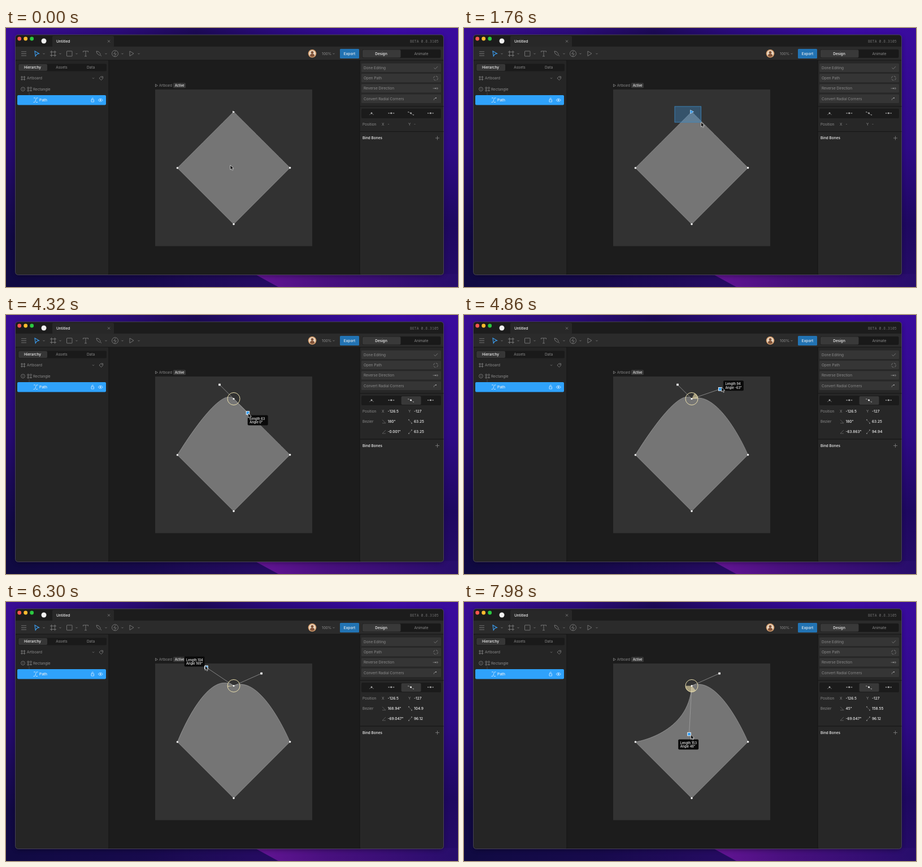
Write an HTML page that moves like this. It is 800 by 459 pixels and loops after 8 s.

```html
<!DOCTYPE html>
<html lang="en">
<head>
<meta charset="utf-8">
<title>Path editing</title>
<style>
html, body { margin: 0; width: 100%; height: 100%; overflow: hidden; background: #1d0a58; }
svg { display: block; width: 100vw; height: 100vh; }
text { font: 6.5px Inter, sans-serif; fill: #8c8c8c; white-space: pre; }
.on { fill: #f2f2f2; font-weight: 500; }
.mid { text-anchor: middle; }
.beta { font: 6.5px "Noto Sans Mono", monospace; fill: #707070; }
.small { font-size: 5.5px; }
.tip { font-size: 5.6px; font-weight: 500; fill: #eee; }
.icon { fill: none; stroke: #858585; stroke-width: .8; }
</style>
</head>
<body>
<svg viewBox="0 0 800 459" preserveAspectRatio="none">
  <defs>
    <linearGradient id="top">
      <stop offset="0" stop-color="#390d94"/><stop offset=".25" stop-color="#2b0b78"/>
      <stop offset=".42" stop-color="#1c0a55"/><stop offset=".6" stop-color="#2a0a7c"/>
      <stop offset=".85" stop-color="#3b0aa2"/><stop offset="1" stop-color="#390b9c"/>
    </linearGradient>
    <linearGradient id="bottom">
      <stop offset="0" stop-color="#100a42"/><stop offset=".3" stop-color="#170a4c"/>
      <stop offset=".55" stop-color="#240b60"/><stop offset="1" stop-color="#260c68"/>
    </linearGradient>
    <linearGradient id="glow">
      <stop offset="0" stop-color="#641595"/><stop offset=".35" stop-color="#49107f"/>
      <stop offset="1" stop-color="#270d6b"/>
    </linearGradient>
    <linearGradient id="left" x2="0" y2="1">
      <stop offset="0" stop-color="#390d94"/><stop offset=".45" stop-color="#260a72"/>
      <stop offset=".63" stop-color="#1b0a57"/><stop offset=".8" stop-color="#110943"/>
      <stop offset="1" stop-color="#100a42"/>
    </linearGradient>
    <linearGradient id="right" x2="0" y2="1">
      <stop offset="0" stop-color="#390b9c"/><stop offset=".45" stop-color="#2e0a86"/>
      <stop offset=".75" stop-color="#1e0860"/><stop offset="1" stop-color="#260c68"/>
    </linearGradient>
    <filter id="blur"><feGaussianBlur stdDeviation="4"/></filter>
  </defs>
  <rect width="800" height="230" fill="url(#top)"/>
  <rect y="230" width="800" height="229" fill="url(#bottom)"/>
  <rect y="12" width="24" height="447" fill="url(#left)"/>
  <rect x="768" y="12" width="32" height="447" fill="url(#right)"/>
  <path d="M440 436L482 459H800V436Z" fill="url(#glow)"/>
  <rect x="17" y="15" width="757" height="424" rx="6" opacity=".4" filter="url(#blur)"/>
  <g id="shell"></g>
  <g id="live"></g>
</svg>
<script>
const LOOP = 8000, UNIT = 0.559, TOP = [403, 148.5];

const rect = (x, y, w, h, fill, rx = 0, more = '') =>
  `<rect x="${x}" y="${y}" width="${w}" height="${h}" fill="${fill}" rx="${rx}" ${more}/>`;
const text = (x, y, s, cls = '') => `<text x="${x}" y="${y + 2.3}" class="${cls}">${s}</text>`;
const dot = (x, y, r, fill, more = '') => `<circle cx="${x}" cy="${y}" r="${r}" fill="${fill}" ${more}/>`;
const icon = (d, more = '') => `<path class="icon" d="${d}" ${more}/>`;
const ring = (x, y, r, more = '') => `<circle class="icon" cx="${x}" cy="${y}" r="${r}" ${more}/>`;
const chevron = (x, y) => icon(`M${x - 1.5} ${y - .7}l1.5 1.5l1.5 -1.5`);

function frame() {
  return rect(16.5, 12, 758, 425.5, '#1c1c1c', 5) +
    rect(82, 14, 109, 20, '#282828', 2) +
    rect(17, 33, 757.5, 24, '#2b2b2b') +
    rect(17, 57, 165, 380, '#252525', 3) +
    rect(626, 57, 148.5, 380, '#272727', 3) +
    rect(182, 57, 444, 380, '#1c1c1c') +
    rect(17, 56.5, 757, 1, '#161616') +
    rect(181.5, 57, 1, 380, '#141414') + rect(625.5, 57, 1, 380, '#141414') +
    rect(16.5, 12, 758, 425.5, 'none', 5, 'stroke="#5b5369" stroke-width=".7"');
}

function header() {
  const lights = ['#fb5650', '#fdbb2e', '#2bc840'].map((c, i) => dot(23.7 + 11 * i, 19, 3.4, c));
  return lights.join('') + dot(67, 23, 4.5, '#f0f0f0') +
    text(89, 23.5, 'Untitled', 'on') + icon('M180 21.5l4 4m0 -4l-4 4') +
    text(715, 23.5, 'BETA 0.8.3105', 'beta') +
    icon('M27 42h9M27 45.5h9M27 49h9') +
    icon('M51 41l7.5 4.3l-4 1.2l-2.3 3.4Z', 'style="stroke:#3ba0f5;stroke-width:1.1"') +
    icon('M80.5 40v11M86.5 40v11M78 42.5h11M78 48.5h11') +
    rect(107.5, 41, 9.5, 9, 'none', .5, 'class="icon"') +
    icon('M136.5 43v-2h9v2M141 41v9M139 50h4') +
    icon('M160 41l4 1l3.5 4.5l-2 2l-4.5 -3.5ZM166.5 47.5l2.5 2.5') +
    ring(193, 45.3, 5.5) + icon('M194 41.5l-3.3 4.3h4.4l-3 4') +
    icon('M219 41v8.6l7 -4.3Z') +
    [67, 96, 125, 177, 206, 235, 580].map(x => chevron(x, 45.5)).join('') +
    dot(542, 45.3, 7.3, '#d39a68') + dot(542, 45.3, 5.8, '#ead8c3') +
    '<path d="M538 49.5a4 4 0 0 1 8 0a5.8 5.8 0 0 1 -8 0Z" fill="#805238"/>' + dot(542, 43.3, 2.4, '#805238') +
    text(559, 45.3, '100%') +
    rect(591, 37, 34, 17, '#2273b3', 1.5) + text(608, 45.3, 'Export', 'on mid') +
    rect(630.5, 38, 139, 15, '#191919', 2) + rect(631, 38.5, 67.5, 14, '#393939', 2) +
    text(664, 45.3, 'Design', 'on mid') + text(735, 45.3, 'Animate', 'mid');
}

function hierarchy() {
  return rect(21, 63.5, 157, 13, '#1a1a1a', 2) + rect(22, 64, 51, 12, '#363636', 2) +
    text(47, 70, 'Hierarchy', 'on mid') + text(98.5, 70, 'Assets', 'mid') + text(150, 70, 'Data', 'mid') +
    icon('M28 85v8M32.5 85v8M26 87h8.5M26 91h8.5') + text(37, 89, 'Artboard') +
    chevron(154.5, 89) + icon('M165 89l3 -3h3.5v3.5l-3 3Z') + dot(169.5, 88, .7, '#858585') +
    ring(30, 108.3, 3.4) + dot(30, 108.3, .8, '#858585') +
    icon('M38 105h2.5v2.5h-2.5ZM38 109.5h2.5v2.5h-2.5ZM42.5 111.5l1.5 -2.5l1.5 2.5Z') + ring(44, 106.2, 1.4) +
    text(48, 108.3, 'Rectangle') +
    icon('M41 114v13.5h6', 'style="stroke:#484848"') +
    rect(20, 119, 157, 17.5, '#2fa2fb', 2) +
    icon('M48.5 131.5h2c2 0 2 -7.5 4 -7.5h2M49 124h3M53 131.5h3', 'style="stroke:#e9f5ff"') +
    text(59, 127.8, 'Path', 'on') +
    icon('M151 127h4.5v4h-4.5ZM152 127v-1.5a1.3 1.3 0 0 1 2.6 0', 'style="stroke:#d5ebff"') +
    icon('M163 127.8q4.2 -5 8.4 0q-4.2 5 -8.4 0Z', 'style="stroke:#d5ebff"') + dot(167.2, 127.8, 1.3, '#d5ebff');
}

function inspectorButtons() {
  const names = ['Done Editing', 'Open Path', 'Reverse Direction', 'Convert Radial Corners'];
  return names.map((s, i) => rect(629, 62.7 + 18.3 * i, 141, 15.3, '#353535', 1.5) + text(633, 70.5 + 18.3 * i, s)).join('') +
    icon('M757.5 70.5l2.2 2.2l4.3 -4.5') +
    ring(760.5, 89, 3.8, 'stroke-dasharray="4 2"') +
    icon('M755.5 107h9M762.5 105l2 2l-2 2') + dot(760, 107, 1.2, '#858585') +
    icon('M757 128q0 -4 4 -4') + dot(761, 124, 1, '#aaa') +
    rect(626, 138.3, 148.5, 1.2, '#181818');
}

function artboard() {
  return icon('M264.5 99.5v4.6l3.8 -2.3Z') + text(271, 101.8, 'Artboard', 'small') +
    rect(296, 97.3, 22, 9, '#383838', 1.5) + text(299, 101.8, 'Active', 'small on') +
    rect(264, 109, 278, 277.5, '#323232');
}

// Smooth monotone interpolation; keys are [time, ...values].
function track(keys, t) {
  const n = keys.findIndex(k => k[0] > t);
  if (n < 1) return keys[n ? keys.length - 1 : 0].slice(1);
  const slope = (i, j) => (keys[i + 1][j] - keys[i][j]) / (keys[i + 1][0] - keys[i][0]);
  const tangent = (i, j) => {
    if (i < 1 || i > keys.length - 2) return 0;
    const a = slope(i - 1, j), b = slope(i, j);
    return a * b <= 0 ? 0 : 2 * a * b / (a + b);
  };
  const [p, q] = [keys[n - 1], keys[n]], d = q[0] - p[0], u = (t - p[0]) / d;
  const w = u * u * (3 - 2 * u);
  return p.slice(1).map((v, k) => {
    const j = k + 1;
    return v + (q[j] - v) * w +
      d * u * (1 - u) * ((1 - u) * tangent(n - 1, j) - u * tangent(n, j));
  });
}

// time, angle, length, pointer offset x, y
const OUT = [[4320, 0, 63.25, .5, .5], [4860, -63.829, 94.93, 2.5, -3.5], [5120, -69.047, 96.12, 1, -1]];
const IN = [[5980, 180, 63.25, .5, .5], [6300, 168.972, 104.79, -2, -3], [6780, 155, 148, -2, -1],
  [6820, 155, 148, -2, -1], [6980, 153, 149, -2, -1], [7280, 153, 149, -2, -1],
  [7420, 150.401, 147.48, -2, 0], [7980, 48.2, 153.3, 3, 1], [8000, 45, 158.55, 3, 1]];
const POINTER = [[740, 397, 243], [1300, 373, 139], [1500, 373, 139], [1760, 419.5, 167], [2000, 431, 175],
  [2280, 437, 178], [2340, 437, 178], [3140, 716, 152], [3160, 716, 152], [3960, 427, 172], [3980, 427, 172],
  [4160, 428.5, 174], [5140, 453, 125.5], [5840, 378.5, 123.5]];

const polar = (deg, r) => [TOP[0] + r * Math.cos(deg * Math.PI / 180), TOP[1] + r * Math.sin(deg * Math.PI / 180)];
const handle = ([angle, length]) => polar(angle + 45, length * UNIT);
const square = ([x, y], active) => active
  ? rect(x - 2.8, y - 2.8, 5.6, 5.6, '#2f9df5', 0, 'stroke="#fff" stroke-width=".9"')
  : rect(x - 1.8, y - 1.8, 3.6, 3.6, '#fff');

function inspector(t, inner, outer) {
  const picked = t >= 2200, bezier = t >= 3160, end = bezier ? 220 : 183.5;
  const tab = bezier ? 2 : picked ? 0 : -1;
  let s = rect(629, 143, 141, 17, '#1b1b1b', 2);
  if (tab >= 0) s += rect(630 + 34.8 * tab, 144, 35, 15, '#383838', 2);
  const arms = ['M643 154l4 -3l4 3', 'M677 151h10', 'M713 149l7.5 5', 'M746 151h10'];
  arms.forEach((d, i) => {
    const x = 647 + 34.8 * i;
    s += icon(d, 'style="stroke:#6d6d6d"') + dot(x, 151, 1.4, i === tab ? '#fff' : '#aaa');
    if (i) s += dot(x - 4.5, i === 2 ? 149 : 151, 1, '#888') + dot(x + 4.5, i === 2 ? 154 : 151, 1, '#888');
  });
  s += text(631, 170.5, 'Position') + text(665, 170.5, 'X') + text(712, 170.5, 'Y');
  s += picked ? text(675.5, 170.5, '-126.5', 'on') + text(722, 170.5, '-127', 'on')
    : text(675.5, 170.5, '-') + text(722, 170.5, '-');
  if (bezier) {
    s += text(631, 188.7, 'Bezier');
    [inner, outer].forEach(([angle, length], i) => {
      const y = 188.7 + 18.3 * i, k = i ? -1 : 1;
      s += icon(`M666 ${y - 3 * k}l6 ${6 * k}M666 ${y + 3}h6`, 'style="stroke:#666"') +
        icon(`M712.5 ${y - 3 * k}l6 ${6 * k}`, 'style="stroke:#666"') +
        dot(713, y - 3 * k, 1, '#888') + dot(718, y + 3 * k, 1, '#888') +
        text(675.5, y, +angle.toFixed(3) + '°', 'on') + text(722, y, +length.toFixed(2), 'on');
    });
  }
  return s + rect(626, end - .6, 148.5, 1.2, '#181818') +
    text(631, end + 11.5, 'Bind Bones', 'on') + icon(`M760 ${end + 11.5}h7M763.5 ${end + 8}v7`);
}

function gauge([angle, length], start, [x, y]) {
  const a = polar(start, 11), b = polar(angle, 11);
  const cx = x + 25 * (x - TOP[0]) / (length * UNIT), cy = y + 18.5 * (y - TOP[1]) / (length * UNIT);
  return `<path d="M${TOP}L${a}A11 11 0 0 0 ${b}Z" fill="#e6d9a8" opacity=".65"/>` +
    dot(...TOP, 11, 'none', 'stroke="#eadfae" stroke-width="1"') +
    rect(cx - 18, cy - 9, 36, 18, '#0a0a0a', 2) +
    text(cx - 14.5, cy - 3.2, 'Length ' + Math.trunc(length), 'tip') +
    text(cx - 14.5, cy + 3.5, 'Angle ' + Math.trunc(angle + .1) + '°', 'tip');
}

function scene(t) {
  const bezier = t >= 3160, dragOut = t > 4320 && t < 5140, dragIn = t >= 5980;
  const outer = track(OUT, t), inner = track(IN, t);
  const o = bezier ? handle(outer) : TOP, i = bezier ? handle(inner) : TOP;
  let [mx, my] = track(POINTER, t);
  if (dragOut) [mx, my] = [o[0] + outer[2], o[1] + outer[3]];
  if (dragIn) [mx, my] = [i[0] + inner[2], i[1] + inner[3]];

  let s = inspector(t, t > 7960 ? track(IN, LOOP) : inner, outer);
  s += `<path d="M303.5 248C303.5 248 ${i} ${TOP}C${o} 502.5 247.8 502.5 247.8L403 347.5Z"
    fill="#757575" stroke="#a3a3a3" stroke-width=".7"/>`;
  s += [[303.5, 248], [502.5, 247.8], [403, 347.5]].map(p => dot(...p, 2, '#fff', 'stroke="#333" stroke-width=".5"')).join('');

  if (bezier) {
    s += `<path d="M${i}L${TOP}L${o}" fill="none" stroke="#aaa" stroke-width=".7"/>`;
    const snapped = dragIn && t > 6980 && Math.abs(i[1] - o[1]) < .8;
    s += square(i, dragIn) + square(o, t >= 4160 && t < 5980);
    if (snapped) s += `<path d="M${i}L${o}" stroke="#e8485f" stroke-width="1"/>` +
      [i, o].map(p => dot(...p, 1.5, '#f4a3ae')).join('');
  }
  if (dragOut) s += gauge(outer, 0, o);
  if (dragIn) s += gauge(inner, 180, i);

  if (bezier) s += dot(...TOP, 1.5, t < 4160 ? '#2f9df5' : '#fff', t < 4160 ? 'stroke="#fff" stroke-width=".7"' : '');
  else if (t >= 1640) s += '<path d="M400.5 145.3l6 3.2l-6 3.2Z" fill="#2f9df5" stroke="#fff" stroke-width=".8"/>';
  else s += '<path d="M401.2 146.8l4 1.9l-4 1.9Z" fill="#fff"/>';

  if (t > 1500 && t < 2200)
    s += rect(373, 139, Math.max(0, mx - 373), Math.max(0, my - 139), '#3c8fcf', 0,
      'fill-opacity=".36" stroke="#3b86bd" stroke-width=".9"');
  return s + `<path transform="translate(${mx} ${my})" d="M0 0V8.2L1.9 6.5L3.2 9.4L4.7 8.7L3.4 5.9H6Z"
    fill="#080808" stroke="#eee" stroke-width=".7"/>`;
}

const live = document.getElementById('live');
document.getElementById('shell').innerHTML =
  frame() + header() + hierarchy() + inspectorButtons() + artboard();

const start = performance.now();
function tick(now) {
  live.innerHTML = scene(Math.max(0, now - start) % LOOP);
  requestAnimationFrame(tick);
}
tick(start);
</script>
</body>
</html>
```
